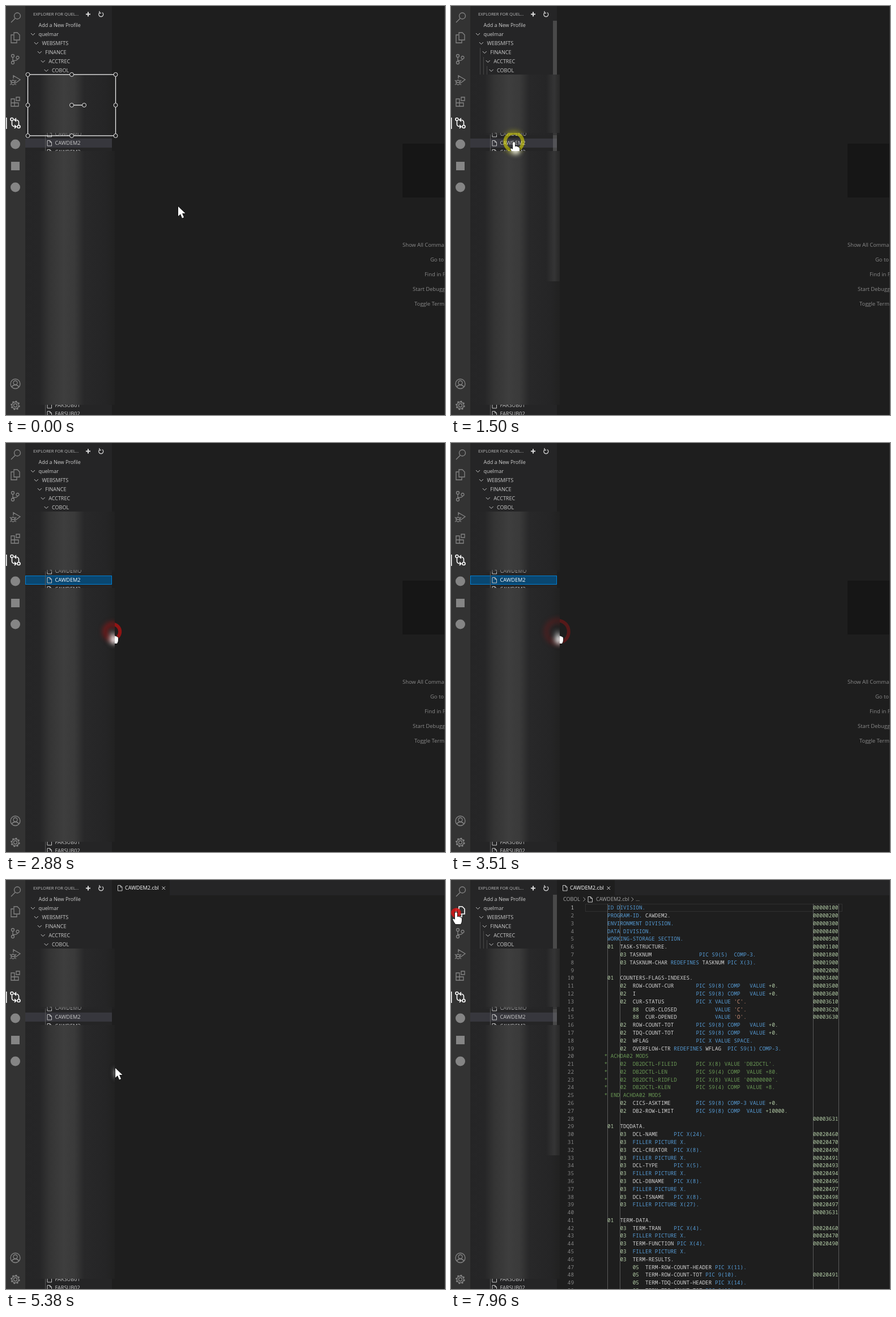
Animation, 775 px wide and 722 px high, one loop 8000 ms. Source, as an HTML page with a canvas:

```html
<!DOCTYPE html>
<html lang="en">
<head>
<meta charset="utf-8">
<title>Source explorer</title>
<style>
html, body { margin: 0; width: 100%; height: 100%; overflow: hidden; background: #1e1e1e; }
canvas { display: block; }
</style>
</head>
<body>
<canvas width="775" height="722"></canvas>
<script>
const ctx = document.querySelector('canvas').getContext('2d');
const LOOP = 8000, CHAR = 5.583, LINE = 13.79, CODE_X = 237;
const MENU_OPEN = 1640, MENU_CLOSE = 2700, TAB_OPEN = 5380, CODE_OPEN = 5440;
const UI = '"Open Sans", sans-serif', MONO = '9.3px "Noto Sans Mono", monospace';

// Column 6 onwards; the part after the bar is the sequence number.
const code = ` ID DIVISION.|00000100
 PROGRAM-ID. CAWDEM2.|00000200
 ENVIRONMENT DIVISION.|00000300
 DATA DIVISION.|00000400
 WORKING-STORAGE SECTION.|00000500
 01  TASK-STRUCTURE.|00001100
     03 TASKNUM               PIC S9(5)  COMP-3.|00001800
     03 TASKNUM-CHAR REDEFINES TASKNUM PIC X(3).|00001900
|00002000
 01  COUNTERS-FLAGS-INDEXES.|00003400
     02  ROW-COUNT-CUR       PIC S9(8) COMP   VALUE +0.|00003500
     02  I                   PIC S9(8) COMP   VALUE +0.|00003600
     02  CUR-STATUS          PIC X VALUE 'C'.|00003610
         88  CUR-CLOSED            VALUE 'C'.|00003620
         88  CUR-OPENED            VALUE 'O'.|00003630
     02  ROW-COUNT-TOT       PIC S9(8) COMP   VALUE +0.
     02  TDQ-COUNT-TOT       PIC S9(8) COMP   VALUE +0.
     02  WFLAG               PIC X VALUE SPACE.
     02  OVERFLOW-CTR REDEFINES WFLAG  PIC S9(1) COMP-3.
* ACHDA02 MODS
*    02  DB2DCTL-FILEID      PIC X(8) VALUE 'DB2DCTL'.
*    02  DB2DCTL-LEN         PIC S9(4) COMP  VALUE +80.
*    02  DB2DCTL-RIDFLD      PIC X(8) VALUE '00000000'.
*    02  DB2DCTL-KLEN        PIC S9(4) COMP  VALUE +8.
* END ACHDA02 MODS
     02  CICS-ASKTIME        PIC S9(8) COMP-3 VALUE +0.
     02  DB2-ROW-LIMIT       PIC S9(8) COMP  VALUE +10000.
|00003631
 01  TDQDATA.
     03  DCL-NAME     PIC X(24).|00020460
     03  FILLER PICTURE X.|00020470
     03  DCL-CREATOR  PIC X(8).|00020490
     03  FILLER PICTURE X.|00020491
     03  DCL-TYPE     PIC X(5).|00020493
     03  FILLER PICTURE X.|00020494
     03  DCL-DBNAME   PIC X(8).|00020496
     03  FILLER PICTURE X.|00020497
     03  DCL-TSNAME   PIC X(8).|00020498
     03  FILLER PICTURE X(27).|00020497
|00003631
 01  TERM-DATA.
     03  TERM-TRAN    PIC X(4).|00020460
     03  FILLER PICTURE X.|00020470
     03  TERM-FUNCTION PIC X(4).|00020490
     03  FILLER PICTURE X.
     03  TERM-RESULTS.
         05  TERM-ROW-COUNT-HEADER PIC X(11).
         05  TERM-ROW-COUNT-TOT PIC 9(10).|00020491
         05  TERM-TDQ-COUNT-HEADER PIC X(14).
         05  TERM-TDQ-COUNT-TOT PIC 9(10).`.split('\n').map(line => line.split('|'));
const KEYWORD = /^(ID|DIVISION|PROGRAM-ID|ENVIRONMENT|DATA|WORKING-STORAGE|SECTION|REDEFINES|FILLER|PICTURE|PIC|S?[X9](\(\d+\))?|COMP(-3)?|VALUE|SPACE)\.?$/;

const icons = [
  [18, 'M14.5 17.500a5.500 5.500 0 1 1 11 0a5.500 5.500 0 1 1-11 0M16 22l-7 7'],
  [55, 'M14 47h6l4 4v9h-10zM13 51h-4v14h10v-4'],
  [93, 'M9.500 88a2.500 2.500 0 1 1 5 0a2.500 2.500 0 1 1-5 0M9.500 100a2.500 2.500 0 1 1 5 0a2.500 2.500 0 1 1-5 0M18 91a2.500 2.500 0 1 1 5 0a2.500 2.500 0 1 1-5 0M12 90.500v7M20.500 93.500q0 3-8.500 3'],
  [131, 'M13 128v-5l12 7-8 6M9 135a3.500 4 0 1 1 7 0a3.500 4 0 1 1-7 0M9 135h7M7 131l2 2M18 131l-2 2M7 139l2-1M18 139l-2-1'],
  [169, 'M9 164h6v13h-6zM9 171h13v6h-13M18 161h6v6h-6z'],
  [207, 'M8 200a2.500 2.500 0 1 1 5 0a2.500 2.500 0 1 1-5 0M20 213a2.500 2.500 0 1 1 5 0a2.500 2.500 0 1 1-5 0M10.500 203v6q0 4 7 4M15 210l3 3-3 3M22.500 210v-5q0-4-7-4M18 198l-3 3 3 3'],
  [667, 'M8 667a8.500 8.500 0 1 1 17 0a8.500 8.500 0 1 1-17 0M13 665a3.500 3.500 0 1 1 7 0a3.500 3.500 0 1 1-7 0M10.500 673q1-4 6-4t6 4']
].map(([y, d]) => [y, new Path2D(d)]);
const ARROW = new Path2D('M0 0V17L4 13.200 7 20.500 10 19 7 12H12.500Z');
const HAND = new Path2D('M-2 1.500Q-2 0 0 0T2 1.500V8Q5 7 6 8.500Q8 8 8.500 9.500Q10 9.500 10 11V15Q10 18 8 21H-1Q-4 17-6 12.500Q-5 10.500-2 13Z');
const IBEAM = new Path2D('M-5-10H-2L0-8 2-10H5M0-8V8M-5 10H-2L0 8 2 10H5');

const moves = [[0, 304, 354], [80, 304, 354], [820, 111, 240], [1690, 111, 240], [2120, 188, 333],
  [4210, 188, 333], [4340, 193, 332], [6130, 193, 332], [6680, 283, 213], [6880, 295, 246],
  [7060, 295, 246], [7840, 9, 57], [LOOP, 9, 57]];
const clicks = [
  { start: 880, release: 1690, x: 111, y: 240, color: '#e0dc00' },
  { start: 2610, release: 3400, x: 188, y: 333, color: '#c01010' },
  { start: 7885, release: 9000, x: 9, y: 58, color: '#d01414' }
];
const menuItems = [[255, 'View Details'], [279, 'Edit'], [298, 'Generate'], [322, 'Retrieve'],
  [341, 'Retrieve with dependencies']];

function rect(x, y, w, h, color) { ctx.fillStyle = color; ctx.fillRect(x, y, w, h); }
function text(str, x, y, color = '#cccccc', size = 9, align = 'left') {
  ctx.font = `${size}px ${UI}`;
  ctx.fillStyle = color;
  ctx.textAlign = align;
  ctx.fillText(str, x, y + 3.2);
}
function stroke(path, color, width = 1) {
  ctx.strokeStyle = color;
  ctx.lineWidth = width;
  ctx.stroke(typeof path === 'string' ? new Path2D(path) : path);
}
function disc(x, y, r, color) {
  ctx.beginPath();
  ctx.arc(x, y, r, 0, 7);
  ctx.fillStyle = color;
  ctx.fill();
}
const chevronDown = (x, y) => stroke(`M${x - 3.500} ${y - 2}l3.500 3.500 3.500-3.500`, '#c5c5c5');
const chevronRight = (x, y) => stroke(`M${x - 1.500} ${y - 3.500}l3.500 3.500-3.500 3.500`, '#a0a0a0');
const fileIcon = (x, y) => stroke(`M${x - 3.500} ${y - 4.500}h4.500l3 3v6.500h-7.500zM${x + 1} ${y - 4.500}v3h3`, '#c5c5c5');

function pointerAt(t) {
  const i = Math.max(1, moves.findIndex(m => m[0] > t));
  const [t0, x0, y0] = moves[i - 1], [t1, x1, y1] = moves[i];
  const p = Math.max(0, (t - t0) / (t1 - t0));
  const e = t0 === 1690 ? p * (2 - p) : p * p * (3 - 2 * p);
  return { x: x0 + (x1 - x0) * e, y: y0 + (y1 - y0) * e };
}

function drawActivityBar(filesHover) {
  rect(0, 0, 34, 722, '#333333');
  rect(0, 197, 1.500, 20, '#ffffff');
  for (const [y, path] of icons) {
    const lit = y === 207 || (y === 55 && filesHover);
    stroke(path, lit ? '#ffffff' : '#858585', lit ? 1.600 : 1.300);
  }
  disc(16.500, 244, 8.500, '#858585');
  rect(9, 275, 15, 15, '#858585');
  disc(16.500, 320, 8.500, '#858585');
  stroke('M13.500 705a3 3 0 1 1 6 0a3 3 0 1 1-6 0M10.500 705a6 6 0 1 1 12 0a6 6 0 1 1-12 0', '#858585', 1.300);
  ctx.setLineDash([2.600, 2.950]);
  stroke('M9.500 705a7 7 0 1 1 14 0a7 7 0 1 1-14 0', '#858585', 2.500);
  ctx.setLineDash([]);
}

function drawSidebar(t, menu, hover) {
  rect(34, 0, 153, 722, '#252526');
  text('EXPLORER FOR QUEL...', 48, 14, '#bbbbbb', 7.6);
  stroke('M141 14.500h8M145 10.500v8', '#dddddd', 2);
  stroke('M165.500 11.500a4 4 0 1 0 4.500 0M165 9v3.500h3', '#d0d0d0', 1.300);
  text('Add a New Profile', 57.500, 34);
  ['quelmar', 'WEBSMFTS', 'FINANCE', 'ACCTREC', 'COBOL'].forEach((name, i) => {
    chevronDown(47.500 + i * 5.900, 50 + i * 16);
    text(name, 57.500 + i * 5.900, 50 + i * 16);
  });
  if (hover) stroke('M51.500 74v48M57.500 90v32M63.500 106v16', '#484848');

  const focused = t >= MENU_CLOSE && t < TAB_OPEN;
  rect(34, 234, 153, 16, focused ? '#094771' : '#37373d');
  if (focused) {
    ctx.strokeStyle = '#007fd4';
    ctx.lineWidth = 1;
    ctx.strokeRect(34.500, 234.500, 152, 15);
  }
  stroke('M69.500 226v34M69.500 704v18', '#585858');
  [[226, 'CAWDEMO'], [242, 'CAWDEM2'], [258, 'CAWDEM3'], [705, 'FARSUB01'], [720, 'FARSUB02']].forEach(([y, name]) => {
    fileIcon(76.500, y);
    text(name, 86.500, y, name === 'CAWDEM2' && focused ? '#ffffff' : '#cccccc', 9.2);
  });
  if (menu) {
    rect(114, 250, 73, 448, '#252526');
    '11 12 13 14 15 17 18 19 2 20 21 23 24 25 26 27 28 30 31 32 33'.split(' ')
      .forEach((n, i) => text('E' + n, 113.500, 353.500 + i * 15.970));
    text('D01', 113, 689);
  }
  if (hover) rect(180, 26, 7, 460, 'rgba(121,121,121,.42)');
}

// Smeared panels that cover most of the file list.
function drawMasks(masks, menu, hover) {
  const smear = ctx.createLinearGradient(34, 0, 192, 0);
  [[0, '#252526'], [.16, '#262627'], [.27, '#343434'], [.43, '#3e3e3e'], [.55, '#3a3a3a'], [.66, '#282829'], [.9, '#252526'], [1, '#212121']]
    .forEach(([at, color]) => smear.addColorStop(at, color));
  for (const [x, y, w, h] of masks) rect(x, y, w, h, smear);
  ctx.globalAlpha = .5;
  rect(34, 224, 158, 4, smear);
  ctx.globalAlpha = 1;
  if (menu) rect(34, 235, 80, 14, 'rgba(55,55,63,.7)');
  if (hover) {
    const glow = ctx.createLinearGradient(168, 0, 192, 0);
    glow.addColorStop(0, 'rgba(70,70,70,0)');
    glow.addColorStop(.6, 'rgba(70,70,70,.5)');
    glow.addColorStop(1, 'rgba(50,50,50,.4)');
    rect(168, 121, 24, 103, glow);
    rect(168, 256, 24, 230, glow);
  }
}

function drawWelcome() {
  rect(700, 243, 95, 95, '#161616');
  [[700, 'Show All Commands'], [749, 'Go to File'], [739, 'Find in Files'], [718, 'Start Debugging'], [721, 'Toggle Terminal']]
    .forEach(([x, label], i) => text(label, x, 422 + i * 26, '#8a8a8a', 9.4));
}

function drawCode(t) {
  ctx.strokeStyle = '#303030';
  ctx.lineWidth = 1;
  ctx.strokeRect(237.500, 42.500, 453, 13);
  for (const column of [7, 11, 72, 80]) rect(Math.round(CODE_X + column * CHAR), 42, 1, 680, '#5a5a5a');
  ctx.font = MONO;
  code.forEach(([source, sequence], row) => {
    const y = 49 + row * LINE + 3.300;
    const put = (str, column, color) => {
      ctx.fillStyle = color;
      ctx.fillText(str, CODE_X + column * CHAR, y);
    };
    ctx.textAlign = 'right';
    ctx.fillStyle = row ? '#858585' : '#c6c6c6';
    ctx.fillText(row + 1, 217, y);
    ctx.textAlign = 'left';
    for (const { 0: word, index } of source.matchAll(/\S+/g)) {
      const color = source[0] === '*' ? '#6a9955'
        : word[0] === "'" ? '#ce9178'
        : /^\+?\d+\.?$/.test(word) ? '#b5cea8'
        : KEYWORD.test(word) ? '#569cd6' : '#d4d4d4';
      put(word, 6 + index, color);
    }
    if (sequence) put(sequence, 72, '#b5cea8');
  });
  if ((t - 5400) % 1000 < 500) rect(236, 42, 2, 14, '#aeafad');
}

function drawEditor(t) {
  rect(187, 0, 588, 27, '#252526');
  rect(187, 0, 102, 27, '#1e1e1e');
  fileIcon(201, 14);
  text('CAWDEM2.cbl', 210, 14, '#ffffff', 9.2);
  stroke('M275.500 11.500l5.500 5.500M281 11.500l-5.500 5.500', '#dddddd');
  if (t < CODE_OPEN) return;
  text('COBOL', 198, 34, '#a9a9a9');
  chevronRight(235, 34);
  fileIcon(245.500, 34);
  text('CAWDEM2.cbl', 256, 34, '#a9a9a9');
  if (t >= 7890) {
    chevronRight(320, 34);
    text('...', 326, 34, '#a9a9a9');
  }
  drawCode(t);
}

function drawMenu(t) {
  ctx.shadowColor = '#000000';
  ctx.shadowBlur = 6;
  rect(114, 240, 150, 113, '#252526');
  ctx.shadowBlur = 0;
  const hoverY = pointerAt(t - 60).y;
  for (const [y, label] of menuItems) {
    const active = Math.abs(hoverY - y) <= 9.500 && hoverY > 245;
    if (active) rect(114, y - 9.500, 150, 18.500, '#094771');
    text(label, 131, y, active ? '#ffffff' : '#cccccc', 8.9);
  }
  rect(120, 265.500, 137, 1, '#606060');
  rect(120, 308.500, 137, 1, '#606060');
}

function drawSelectionBox() {
  ctx.strokeStyle = '#f0f0f0';
  ctx.lineWidth = 1.300;
  ctx.strokeRect(38.500, 121, 155, 108);
  stroke('M116 175h22', '#f0f0f0', 1.300);
  const handles = [[116, 175], [138, 175]];
  for (const x of [38.500, 116, 193.500])
    for (const y of [121, 175, 229]) if (x !== 116 || y !== 175) handles.push([x, y]);
  for (const [x, y] of handles) {
    disc(x, y, 3.500, '#252526');
    ctx.strokeStyle = '#e8e8e8';
    ctx.lineWidth = 1;
    ctx.stroke();
  }
}

function drawPointer(t, pos, menu) {
  for (const { start, release, x, y, color } of clicks) {
    const age = t - start, fade = Math.max(0, (t - release) / 430);
    if (age < 0 || fade >= 1) continue;
    const radius = 17 * (1 - Math.exp(-age / 150)) + 15 * fade;
    ctx.globalAlpha = (.5 + .5 * Math.exp(-age / 300)) * (1 - fade) ** 1.500;
    ctx.beginPath();
    ctx.arc(x, y, Math.max(1, radius - 1), 0, 7);
    ctx.strokeStyle = color;
    ctx.lineWidth = Math.min(6, radius);
    ctx.stroke();
    ctx.globalAlpha = 1;
  }
  ctx.save();
  ctx.translate(pos.x, pos.y);
  if (t >= CODE_OPEN && pos.x > 236) {
    stroke(IBEAM, '#4a4a4a', 2.200);
    stroke(IBEAM, '#000000', 1.300);
  } else {
    const shape = !menu && pos.x < 190 ? HAND : ARROW;
    stroke(shape, '#111111', 1.500);
    ctx.fillStyle = '#ffffff';
    ctx.fill(shape);
  }
  ctx.restore();
}

function draw(t) {
  const menu = t >= MENU_OPEN && t < MENU_CLOSE;
  const pos = pointerAt(t);
  const hover = (t < MENU_OPEN && pos.x < 187) || (t > 7060 && pos.x < 187);
  const masks = [[34, 121, 158, 103], menu ? [34, 230, 80, 492] : [34, 256, 158, 448]];

  rect(0, 0, 775, 722, '#1e1e1e');
  if (t < TAB_OPEN) drawWelcome(); else drawEditor(t);
  rect(774, 0, 1, 722, '#383838');
  drawSidebar(t, menu, hover);
  drawMasks(masks, menu, hover);
  drawActivityBar(pos.x < 32 && pos.y < 75);
  if (menu) drawMenu(t);
  if (t < 80) drawSelectionBox();

  // The pointer is sharp outside the panels and smeared inside them.
  const inside = new Path2D(), outside = new Path2D();
  outside.rect(0, 0, 775, 722);
  for (const mask of masks) {
    inside.rect(...mask);
    outside.rect(...mask);
  }
  for (const [region, filter] of [[outside, 'none'], [inside, 'blur(5px)']]) {
    ctx.save();
    ctx.clip(region, 'evenodd');
    ctx.filter = filter;
    drawPointer(t, pos, menu);
    ctx.restore();
  }
}

function frame() {
  draw(performance.now() % LOOP);
  requestAnimationFrame(frame);
}
frame();
</script>
</body>
</html>
```
